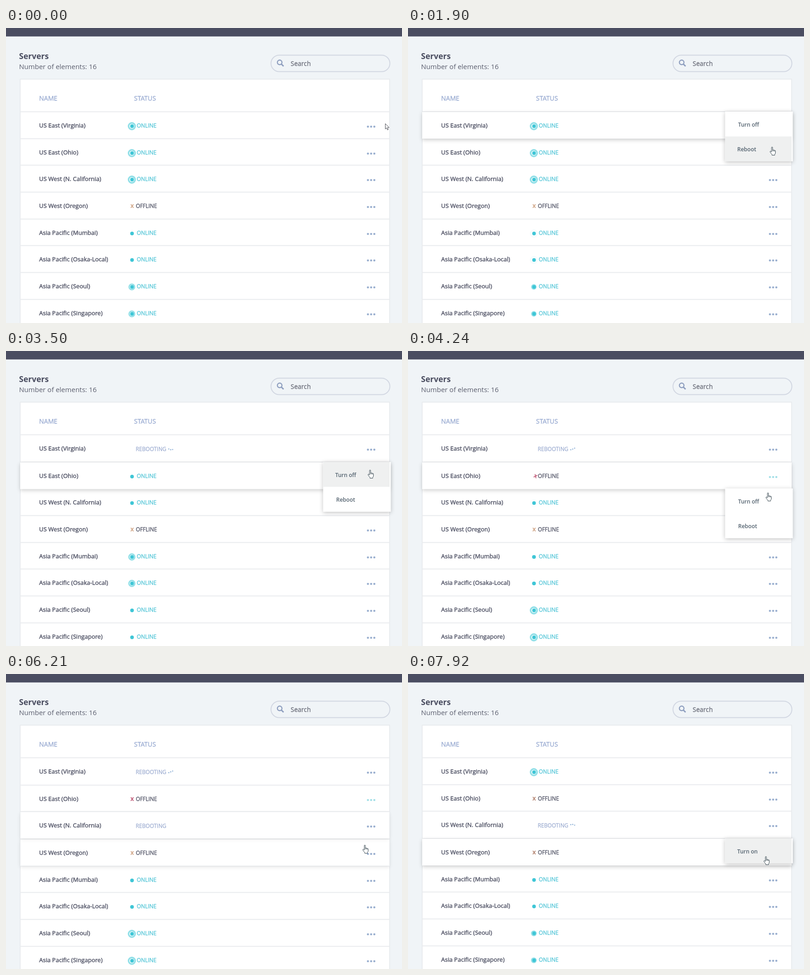
An HTML page for the animation above (8000 ms loop, 866 by 646 pixels).

```html
<!DOCTYPE html>
<html lang="en">
<head>
<meta charset="utf-8">
<title>Servers</title>
<style>
  html, body { margin: 0; width: 100%; height: 100%; overflow: hidden; background: #f0f4f7; }
  svg { display: block; width: 866px; height: 646px; font-family: "Open Sans", "Noto Sans", sans-serif; }
  .thick { stroke: currentColor; stroke-width: .3px; fill: currentColor; }
  .head { font-size: 14px; color: #98aad1; }
  .name { font-size: 13px; color: #4a4d60; stroke-width: .4px; }
  .status { font-size: 11.8px; }
  .online { color: #4fc4d6; }
  .offline { color: #4a4d60; }
  .reboot { color: #9dadd1; }
  .cross { font-size: 13.5px; font-weight: 700; text-anchor: middle; }
  .item { font-size: 12px; font-weight: 600; fill: #53626f; }
  .lift { filter: drop-shadow(0 3px 4px rgba(0, 0, 0, .18)); }
  .menu { filter: drop-shadow(0 2px 5px rgba(0, 0, 0, .24)); }
</style>
</head>
<body>
<svg viewBox="0 0 866 646">
  <rect width="866" height="646" fill="#f0f4f7"/>
  <rect width="866" height="18.5" fill="#4a4d61"/>
  <text x="28.5" y="68" font-size="17.5" font-weight="700" fill="#4a4d60">Servers</text>
  <text x="28.5" y="90.3" font-size="15" fill="#5b5e6e">Number of elements: 16</text>
  <rect x="579.5" y="59.5" width="260" height="36" rx="18" fill="#f0f4f7" stroke="#d2d7e2" stroke-width="2"/>
  <g fill="none" stroke="#8f9fbf" stroke-width="2.4">
    <circle cx="598.5" cy="75.3" r="5"/>
    <path d="M602.2 79 607 83.8" stroke-width="3"/>
  </g>
  <text class="thick" x="622.5" y="83" font-size="14" color="#6c6f7b">Search</text>
  <rect x="31" y="112" width="808" height="560" fill="#fff" stroke="#e9ecef" stroke-width="2"/>
  <text class="head thick" x="72.5" y="159">NAME</text>
  <text class="head thick" x="280" y="159">STATUS</text>
  <g id="lines" fill="#e9ebee"></g>
  <g id="lifts"></g>
  <g id="rows"></g>
  <g id="menus"></g>
  <path id="arrow" d="M.5.5V12.2L3.2 9.7 5.1 14.2 7.1 13.3 5.2 9H9Z" fill="#fff" stroke="#4a4d55"/>
  <path id="hand" d="M4 11.5V2Q4 .6 5.2.6T6.4 2V7Q7.6 6 8.6 7.4 9.8 6.7 10.7 8.1 12.6 7.6 12.6 9.6V13Q12.4 15.5 11 16.6V18.6H5V16.8Q3.4 15.4 .8 11.4.4 9.8 2 9.7 3 10 4 11.5ZM6.4 7V10M8.6 7.6V10M10.7 8.3V10.4" fill="#fff" stroke="#34454e" stroke-linejoin="round"/>
</svg>
<script>
const LOOP = 8000, PITCH = 58.7, ITEM = 54.5;
const PULSE = 1000, REBOOT = 4700;
const NAMES = ['US East (Virginia)', 'US East (Ohio)', 'US West (N. California)', 'US West (Oregon)',
  'Asia Pacific (Mumbai)', 'Asia Pacific (Osaka-Local)', 'Asia Pacific (Seoul)', 'Asia Pacific (Singapore)'];
const PAIR_OFFSETS = [.7, .7, .03, .5];

// The pointer visits the first rows in turn: enter a row, open its menu, pick an item.
const VISITS = [
  { enter: 150, open: 440, pick: 2560, items: ['Turn off', 'Reboot'] },
  { enter: 2580, open: 2580, pick: 3650, items: ['Turn off', 'Reboot'] },
  { enter: 4740, open: 4120, pick: 5980, items: ['Turn off', 'Reboot'] },
  { enter: 6150, open: 6260, pick: Infinity, items: ['Turn on'] }
];
const REBOOT_AT = { 0: 2560, 2: 6150 };
const OFFLINE_AT = { 1: 4100, 3: -1000 };
const CROSS_COLOR = { 1: '#c2607c', 3: '#d2a98c' };
const SETTLED = REBOOT_AT[0] + REBOOT;

// Pointer moves: start, duration, x, y.
const HOME = [829, 209];
const MOVES = [[20, 270, 793, 208], [1260, 500, 791, 260], [3820, 420, 782, 310],
  [4660, 620, 782, 353], [5500, 400, 779.5, 374], [7000, 720, 777.5, 399]];

const clamp = v => Math.min(1, Math.max(0, v));
const ease = v => v * v * (3 - 2 * v);
const fade = (t, from, to, d = 120) => clamp((t - from) / d) - clamp((t - to) / d);

function set(el, attrs) {
  for (const key in attrs) el.setAttribute(key, attrs[key]);
  return el;
}
function add(parent, tag, attrs = {}, text = '') {
  const el = set(document.createElementNS('http://www.w3.org/2000/svg', tag), attrs);
  el.textContent = text;
  return parent.appendChild(el);
}
const byId = id => document.getElementById(id);
const move = (el, x, y) => set(el, { transform: `translate(${x} ${y})` });
const show = (el, on) => set(el, { visibility: on ? 'visible' : 'hidden' });

const rows = NAMES.map(name => {
  const line = add(byId('lines'), 'rect', { x: 31, width: 808, height: 2 });
  const g = add(byId('rows'), 'g');
  add(g, 'text', { class: 'name thick', x: 72.5, y: 33.5 }, name);
  const more = add(g, 'g');
  for (let n = 0; n < 3; n++) add(more, 'circle', { cx: 791.5 + 7 * n, cy: 32, r: 2.3 });

  const online = add(g, 'g');
  const ring = add(online, 'circle', { cx: 275.2, cy: 31, fill: 'none', stroke: '#93e0e8' });
  add(online, 'circle', { cx: 275.6, cy: 31, r: 4, fill: '#3fc6d6' });
  add(online, 'text', { class: 'status online thick', x: 286, y: 34.2 }, 'ONLINE');

  const offline = add(g, 'g');
  const cross = add(offline, 'text', { class: 'cross', y: 3.5 }, 'x');
  add(offline, 'text', { class: 'status offline thick', x: 284, y: 34.2 }, 'OFFLINE');

  const reboot = add(g, 'g');
  add(reboot, 'text', { class: 'status reboot thick', x: 283.8, y: 35 }, 'REBOOTING');
  const loader = [0, 1, 2].map(n => add(reboot, 'circle', { cx: 356 + n * 4.2, r: 1.3, fill: '#94b4d8' }));
  return { line, g, more, online, ring, offline, cross, reboot, loader };
});

const lifts = VISITS.map(() =>
  add(byId('lifts'), 'rect', { class: 'lift', x: 31, width: 808, height: 58.5, fill: '#fff' }));

const menus = VISITS.map(({ items }) => {
  const g = add(byId('menus'), 'g', { class: 'menu' });
  add(g, 'rect', { x: 693.5, width: 148, height: ITEM * items.length, fill: '#fff' });
  const entries = items.map((label, n) => ({
    back: add(g, 'rect', { x: 694, y: ITEM * n, width: 145, height: ITEM, fill: '#eff0f0' }),
    text: add(g, 'text', { class: 'item', y: 32.8 + ITEM * n }, label)
  }));
  return { g, entries };
});

const rebooting = (t, i) => t >= REBOOT_AT[i] && t < REBOOT_AT[i] + REBOOT;

// A rebooting row is one pixel taller.
function rowTop(t, i) {
  let top = Math.round(183.9 + PITCH * i);
  for (let k = 0; k < i; k++) top += rebooting(t, k);
  return top;
}

function pointer(t) {
  let [x, y] = HOME;
  for (const [start, duration, toX, toY] of MOVES) {
    const f = ease(clamp((t - start) / duration));
    x += (toX - x) * f;
    y += (toY - y) * f;
  }
  return [x, y];
}

function drawRow(row, i, t) {
  const top = rowTop(t, i), busy = rebooting(t, i), off = t >= OFFLINE_AT[i];
  move(row.g, 0, top);
  set(row.line, { y: top - 1.6 });
  show(row.online, !busy && !off);
  show(row.offline, off);
  show(row.reboot, busy);
  const switching = i === 1 && t > VISITS[1].pick && t < SETTLED;
  set(row.more, { fill: switching ? '#a3dfe7' : '#9aafcf' });

  const phase = (t / PULSE + PAIR_OFFSETS[i >> 1]) % 1;
  const scale = clamp(phase / .6);
  set(row.ring, { r: 7.1 * scale, 'stroke-width': 3.6 * scale, opacity: clamp((.95 - phase) / .2) });

  if (off) {
    const spin = 1 - clamp((t - OFFLINE_AT[i]) / 320);
    set(row.cross, {
      fill: t < SETTLED ? CROSS_COLOR[i] : '#b88c7a',
      transform: `translate(${276 + 5 * spin} 30.2) rotate(${45 * spin})`
    });
  }
  if (busy) {
    row.loader.forEach((dot, n) => set(dot, {
      cy: 30.3 + 2 * Math.sin(t / 160 - n * 1.1),
      opacity: clamp((t - REBOOT_AT[i] - 600) / 200)
    }));
  }
}

function drawVisit({ enter, open, pick }, i, t, pointerY) {
  const top = rowTop(t, i), leave = VISITS[i + 1]?.enter ?? Infinity;
  set(lifts[i], { y: top, opacity: fade(t, enter, leave) });

  const { g, entries } = menus[i];
  move(g, 0, top - 1);
  set(g, { opacity: fade(t, open, pick) });
  const hovered = Math.floor((pointerY - top + 1) / ITEM);
  entries.forEach(({ back, text }, n) => {
    const hover = n === hovered ? clamp((t - open - 200) / 120) : 0;
    set(back, { opacity: hover });
    set(text, { x: 722 - 2 * hover });
  });
}

function draw(t) {
  const [x, y] = pointer(t), pointing = t >= 250;
  rows.forEach((row, i) => drawRow(row, i, t));
  VISITS.forEach((visit, i) => drawVisit(visit, i, t, y));
  show(move(byId('arrow'), x, y), !pointing);
  show(move(byId('hand'), x, y), pointing);
}

const start = performance.now();
function tick() {
  draw((performance.now() - start) % LOOP);
  requestAnimationFrame(tick);
}
tick();
</script>
</body>
</html>
```
